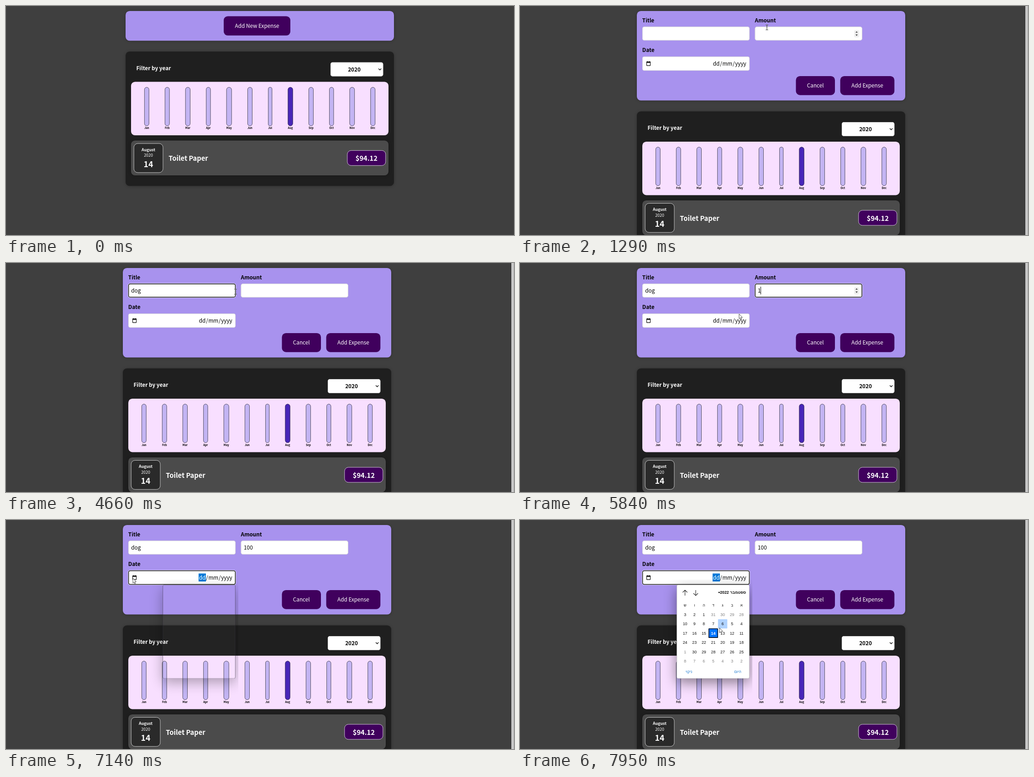
An HTML page with a canvas that plays this animation: 1113 px wide and 503 px high, repeating every 8 s.

```html
<!DOCTYPE html>
<html lang="en">
<head>
<meta charset="utf-8">
<title>Expense form</title>
<style>
html, body { margin: 0; height: 100%; overflow: hidden; background: #3f3f3f; }
canvas { display: block; }
</style>
</head>
<body>
<canvas id="stage" width="1113" height="503"></canvas>
<script>
const ctx = document.getElementById('stage').getContext('2d');
const LOOP = 8000, REM = 11.76, RADIUS = 8.82;
const SANS = '"Noto Sans CJK JP", "Noto Sans CJK", sans-serif';
const ARIAL = '"Liberation Sans", Arial, sans-serif';
const PURPLE = '#40005d';
const MONTHS = 'Jan Feb Mar Apr May Jun Jul Aug Sep Oct Nov Dec'.split(' ');

// Moments, in ms
const OPEN = 1290, FOCUS_TITLE = 2140, FOCUS_AMOUNT = 5075, FOCUS_DATE = 6930;
const POPUP = 7140, POPUP_SOLID = 7270, BLINK = 520;
const TITLE_KEYS = [3450, 3850, 4050], AMOUNT_KEYS = [5580, 5990, 6130];

// Pointer stops: time, x, y
const POINTER = [
  [190, 1086, 484], [940, 541, 47], [1610, 541, 47], [2100, 400, 61],
  [4470, 400, 61], [4660, 503, 63], [4810, 560, 61], [5010, 560, 61],
  [5140, 532, 118], [5580, 532, 118], [5840, 480, 112], [6320, 297, 139],
  [6400, 297, 139], [6870, 278, 128], [7420, 278, 128], [7950, 437, 237]
];

function pointerAt(t) {
  const next = POINTER.findIndex(stop => stop[0] > t);
  if (next < 0) return POINTER.at(-1).slice(1);
  if (next === 0) return [-99, -99];
  const [t0, x0, y0] = POINTER[next - 1], [t1, x1, y1] = POINTER[next];
  const p = (t - t0) / (t1 - t0), e = p * p * (3 - 2 * p);
  return [x0 + (x1 - x0) * e, y0 + (y1 - y0) * e];
}

const inside = ([x, y], x1, y1, x2, y2) => x >= x1 && x < x2 && y >= y1 && y < y2;

function box(x1, y1, x2, y2, radius, fill, { stroke, line = 0.75, shadow } = {}) {
  ctx.save();
  ctx.beginPath();
  ctx.roundRect(x1, y1, x2 - x1, y2 - y1, radius);
  if (shadow) {
    ctx.shadowColor = 'rgba(0,0,0,.25)';
    ctx.shadowBlur = 6;
    ctx.shadowOffsetY = 0.8;
  }
  ctx.fillStyle = fill;
  ctx.fill();
  ctx.restore();
  if (stroke) {
    const h = line / 2;
    ctx.beginPath();
    ctx.roundRect(x1 + h, y1 + h, x2 - x1 - line, y2 - y1 - line, Math.max(0, radius - h));
    ctx.strokeStyle = stroke;
    ctx.lineWidth = line;
    ctx.stroke();
  }
}

function text(str, x, y, { size = REM, weight = 400, color = '#fff', align = 'left', family = SANS } = {}) {
  ctx.font = `${weight} ${size}px ${family}`;
  ctx.fillStyle = color;
  ctx.textAlign = align;
  ctx.fillText(str, x, y);
}

function path(points, { fill, stroke, line = 1, close = false }) {
  ctx.beginPath();
  points.forEach(([x, y]) => ctx.lineTo(x, y));
  if (close || fill) ctx.closePath();
  if (fill) { ctx.fillStyle = fill; ctx.fill(); }
  if (stroke) { ctx.strokeStyle = stroke; ctx.lineWidth = line; ctx.stroke(); }
}

function button(label, x1, y1, x2, y2, fill = PURPLE) {
  box(x1, y1, x2, y2, RADIUS, fill);
  text(label, (x1 + x2) / 2, (y1 + y2) / 2 + 4.5, { align: 'center' });
}

function drawChart() {
  box(274, 166.5, 838, 284, RADIUS, '#f8dfff');
  ctx.font = `700 5.88px ${SANS}`;
  const widths = MONTHS.map(m => ctx.measureText(m).width);
  const gap = (540.5 - widths.reduce((a, b) => a + b)) / 12;
  let x = 285.8 + gap / 2;
  MONTHS.forEach((month, i) => {
    const w = widths[i];
    box(x, 178.2, x + w, 263.6, w / 2, month === 'Aug' ? '#4826b9' : '#c3b4f3', { stroke: '#313131' });
    text(month, x, 270.4, { size: 5.88, weight: 700, color: '#000' });
    x += w + gap;
  });
}

function drawExpenses() {
  box(262, 100, 850, 395.3, RADIUS, '#1f1f1f', { shadow: true });
  text('Filter by year', 285.5, 141, { weight: 700 });
  box(711, 123.7, 826.3, 154.4, 4.4, '#fff', { stroke: '#ccc' });
  text('2020', 763, 143.6, { weight: 700, color: '#000', align: 'center' });
  path([[816.2, 137.4], [819.2, 140.6], [822.2, 137.4]], { stroke: '#111', line: 1.4 });
  drawChart();
  box(274, 295.5, 838, 372, RADIUS, '#4b4b4b', { shadow: true });
  box(279.8, 301.7, 344.4, 366.3, RADIUS, '#2a2a2a', { stroke: '#fff' });
  text('August', 312, 318.6, { size: 8.82, weight: 700, align: 'center' });
  text('2020', 312, 331.2, { size: 8.82, align: 'center' });
  text('14', 312, 353.8, { size: 17.64, weight: 700, align: 'center' });
  text('Toilet Paper', 356.3, 340.4, { size: 14.7, weight: 700 });
  box(747.4, 317, 832.2, 350.8, RADIUS, PURPLE, { stroke: '#fff' });
  text('$94.12', 789.8, 340.4, { size: 14.7, weight: 700, align: 'center' });
}

function field(x, y, height, focused) {
  if (!focused) return box(x, y, x + 235, y + height, 4.4, '#fff', { stroke: '#ccc' });
  box(x - 0.9, y - 0.9, x + 235.9, y + height + 0.9, 5.2, '#fff');
  box(x - 0.2, y - 0.2, x + 235.2, y + height + 0.2, 4.4, '#fff', { stroke: '#101010', line: 1.5 });
}

function typed(str, keys, focusedAt, focused, x, t) {
  const shown = str.slice(0, keys.filter(k => k <= t).length);
  text(shown, x, 65.2, { color: '#000' });
  const last = [focusedAt, ...keys].filter(k => k <= t).pop();
  if (focused && Math.floor((t - last) / BLINK) % 2 === 0) {
    ctx.fillRect(Math.floor(x + ctx.measureText(shown).width), 52, 1, 17);
  }
}

function drawSpinner() {
  box(732, 53, 743, 69, 3, '#efefef');
  path([[735, 58.6], [737.5, 55.4], [740, 58.6]], { fill: '#444' });
  path([[735, 62.6], [737.5, 65.8], [740, 62.6]], { fill: '#444' });
}

function drawDateField(focused) {
  field(268, 111, 31, focused);
  box(277, 122.2, 286, 131.4, 1, '#fff', { stroke: '#000', line: 1.1 });
  ctx.fillStyle = '#000';
  ctx.fillRect(277, 122.2, 9, 2.5);
  ctx.fillRect(278.6, 121.2, 1.1, 2);
  ctx.fillRect(283.3, 121.2, 1.1, 2);
  if (focused) {
    ctx.fillStyle = '#0078d7';
    ctx.fillRect(422, 117.5, 16, 17.5);
  }
  text('dd', 422.8, 131.2, { color: focused ? '#fff' : '#000' });
  [['/', 438.2], ['mm', 443.4], ['/', 466], ['yyyy', 471.2]]
    .forEach(([part, x]) => text(part, x, 131.2, { color: '#000' }));
}

function drawForm(t, pointer) {
  const onTitle = t >= FOCUS_TITLE && t < FOCUS_AMOUNT;
  const onAmount = t >= FOCUS_AMOUNT && t < FOCUS_DATE;
  box(256, 11, 844, 207.5, RADIUS, '#a892ee', { shadow: true });
  [['Title', 267.8, 35.6], ['Amount', 514.6, 35.6], ['Date', 267.8, 101.2]]
    .forEach(([label, x, y]) => text(label, x, y, { weight: 700, color: '#000' }));
  field(268, 45.4, 30.2, onTitle);
  field(514.7, 45.4, 30.2, onAmount);
  typed('dog', TITLE_KEYS, FOCUS_TITLE, onTitle, 274.3, t);
  typed('100', AMOUNT_KEYS, FOCUS_AMOUNT, onAmount, 521.1, t);
  if (onAmount || inside(pointer, 515, 45, 750, 76)) drawSpinner();
  drawDateField(t >= FOCUS_DATE);
  button('Cancel', 604.5, 154, 690, 195.7);
  button('Add Expense', 701.6, 154, 820.3, 195.7);
}

function drawPopupFrame(alpha) {
  ctx.save();
  ctx.beginPath();
  ctx.rect(310, 131, 199, 272);
  ctx.roundRect(343.5, 142.5, 159, 205.5, 3);
  ctx.clip('evenodd');
  ctx.shadowColor = `rgba(0,0,0,${alpha})`;
  ctx.shadowBlur = 28;
  ctx.shadowOffsetY = 9;
  ctx.fillStyle = '#000';
  ctx.beginPath();
  ctx.roundRect(343.5, 142.5, 159, 205.5, 3);
  ctx.fill();
  ctx.restore();
}

function drawCalendar(pointer) {
  box(343.5, 142.5, 502.5, 348, 3, '#fff', { stroke: '#bbb', line: 0.5 });
  const label = (str, x, y, opts) =>
    text(str, x, y, { size: 8.82, color: '#111', align: 'center', family: ARIAL, ...opts });
  const ink = { stroke: '#222', line: 1.1 };
  [[361.5, 1], [385, -1]].forEach(([x, up]) => {
    path([[x, 160 + 6 * up], [x, 160 - 6 * up]], ink);
    path([[x - 5, 160 - up], [x, 160 - 6 * up], [x + 5, 160 - up]], ink);
  });
  label('ספטמבר 2022', 495, 162.4, { weight: 700, align: 'right' });
  path([[433.8, 158], [438.8, 158], [436.3, 160.9]], { fill: '#111' });

  const hoverCol = Math.floor((pointer[0] - 351.3) / 20.6);
  const hoverRow = Math.floor((pointer[1] - 197.3) / 20.5);
  for (let col = 0; col < 7; col++) {
    const x = 361.6 + col * 20.6;
    label('שוהדגבא'[col], x, 189.8, { size: 8 });
    for (let row = 0; row < 6; row++) {
      const y = 207.6 + row * 20.5;
      const date = new Date(2022, 7, 28 + row * 7 + 6 - col);
      const thisMonth = date.getMonth() === 8;
      const chosen = thisMonth && date.getDate() === 14;
      if (chosen) box(x - 10.3, y - 10.3, x + 10.3, y + 10.3, 1, '#0075ff', { stroke: '#000', line: 1.3 });
      else if (col === hoverCol && row === hoverRow) box(x - 10.2, y - 10.2, x + 10.2, y + 10.2, 1, '#b0d3ff');
      label(date.getDate(), x, y + 3.1, {
        color: chosen ? '#fff' : thisMonth ? '#111' : '#808080',
        weight: chosen ? 700 : 400
      });
    }
  }
  label('היום', 477, 336, { color: '#1a78cf', size: 8.4 });
  label('ניקוי', 370, 336, { color: '#1a78cf', size: 8.4 });
}

function drawPointer(kind, [x, y]) {
  ctx.save();
  ctx.translate(x, y);
  if (kind === 'beam') {
    ctx.globalCompositeOperation = 'difference';
    ctx.fillStyle = '#ddd';
    ctx.fillRect(-0.5, -6, 1, 12);
    for (const end of [-6, 5]) {
      ctx.fillRect(-2.5, end, 2, 1);
      ctx.fillRect(0.5, end, 2, 1);
    }
  } else if (kind === 'hand') {
    path([[-1, 0], [1, 0], [1, 4], [6, 5], [7, 7], [6, 12], [0, 12], [-4, 7], [-3, 6], [-1, 8]],
      { fill: '#fff', stroke: '#222', line: 0.8 });
  } else {
    path([[0, 0], [0, 10.6], [2.4, 8.4], [4, 12], [5.6, 11.3], [4.1, 7.8], [7.3, 7.6]],
      { fill: '#fff', stroke: '#222', line: 0.8 });
  }
  ctx.restore();
}

function pointerKind(t, p) {
  if (t < OPEN) {
    if (!inside(p, 477, 22, 623, 65)) return 'arrow';
    return t < 1200 ? 'hand' : 'beam';
  }
  return inside(p, 268, 45, 506, 76) || inside(p, 514, 45, 750, 76) ? 'beam' : 'arrow';
}

function draw(t) {
  const pointer = pointerAt(t);
  ctx.fillStyle = '#3f3f3f';
  ctx.fillRect(0, 0, 1113, 503);
  if (t < OPEN) {
    box(262, 11, 850, 76.3, RADIUS, '#a892ee', { shadow: true });
    button('Add New Expense', 477, 22.5, 623, 64.8, inside(pointer, 477, 22, 623, 65) ? '#510674' : PURPLE);
    drawExpenses();
  } else {
    drawForm(t, pointer);
    ctx.save();
    ctx.translate(-6, 131.4);
    drawExpenses();
    ctx.restore();
    ctx.fillStyle = '#f1f1f1';
    ctx.fillRect(1107.5, 0, 6, 503);
    ctx.fillStyle = '#c1c1c1';
    ctx.fillRect(1109, 0, 4, 503);
    if (t >= POPUP) drawPopupFrame(t < POPUP_SOLID ? 0.3 : 0.45);
    if (t >= POPUP_SOLID) drawCalendar(pointer);
    else if (t >= POPUP) box(343.5, 142.5, 502.5, 348, 3, 'rgba(255,255,255,.02)', { stroke: 'rgba(90,80,100,.5)', line: 0.6 });
  }
  drawPointer(pointerKind(t, pointer), pointer);
}

function tick() {
  draw(performance.now() % LOOP);
  requestAnimationFrame(tick);
}
tick();
</script>
</body>
</html>
```
